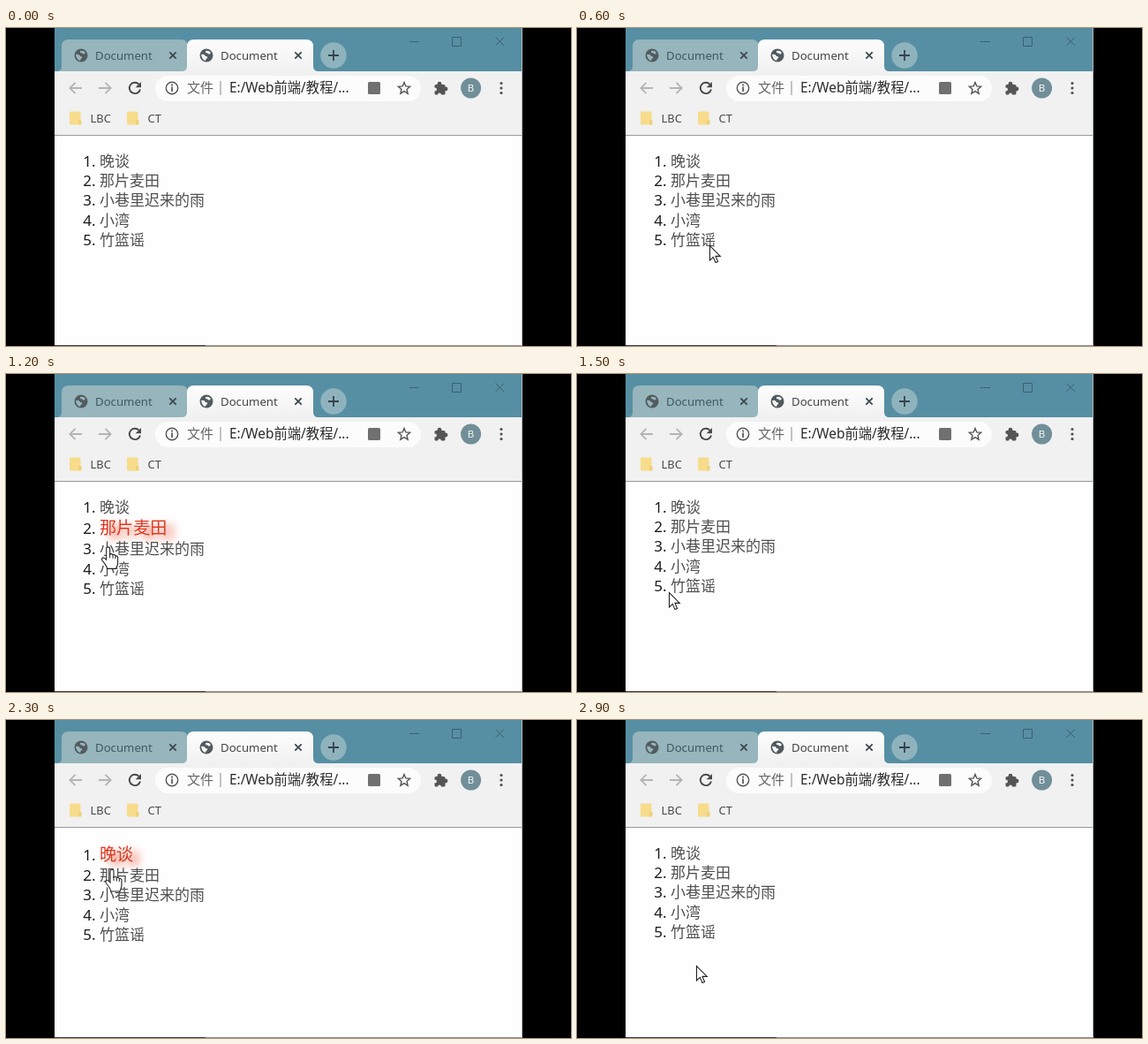
An HTML page with a canvas that plays this animation: 640x360 px, repeating every 3 s.

```html
<!DOCTYPE html>
<html lang="zh-CN">
<head>
<meta charset="utf-8">
<style>
html, body { margin: 0; width: 100%; height: 100%; overflow: hidden; background: #000; }
canvas { display: block; width: 640px; height: 360px; }
</style>
</head>
<body>
<canvas id="stage" width="640" height="360"></canvas>
<script>
const ctx = document.getElementById('stage').getContext('2d');
const FONT = '"Noto Sans", "Noto Sans CJK SC", sans-serif';
const LOOP = 3000, STEP = 100, HOVER_LAG = 100;
const ITEMS = ['晚谈', '那片麦田', '小巷里迟来的雨', '小湾', '竹篮谣'];
const ROW = 22.2, LIST_TOP = 140, LIST_X = 106;

// Pointer path: time, x, y
const PATH = [
  [0, 190, 385], [500, 158, 272], [600, 150, 246], [700, 146, 222],
  [900, 129, 159], [1000, 126, 157], [1100, 123, 168], [1400, 101, 250],
  [1500, 104, 247], [1600, 118, 236], [1800, 134, 219], [1900, 136, 210],
  [2100, 128, 166], [2200, 122, 156], [2300, 120, 169], [2400, 122, 200],
  [2600, 132, 266], [2900, 135, 278]
];
const ARROW = new Path2D('M.5 .5V17L4.3 13.4L7 19.6L9.6 18.5L7 12.4H12.3Z');
const HAND = new Path2D('M-2 2Q-2 .5 0 .5Q2 .5 2 2V9Q4 7.3 5.4 9.5Q7.4 8.4 8.3 10.6Q11 10 11 13V18Q11 21 9 25H-1Q-2 21 -6.5 16Q-8 13.5 -6 12.6Q-4.5 12 -2 15Z');

function pointer(t) {
  const next = PATH.findIndex(p => p[0] >= t);
  if (next < 1) return PATH[next < 0 ? PATH.length - 1 : 0].slice(1);
  const [t0, x0, y0] = PATH[next - 1], [t1, x1, y1] = PATH[next];
  const k = (t - t0) / (t1 - t0);
  return [x0 + (x1 - x0) * k, y0 + (y1 - y0) * k];
}

function hoveredRow([x, y]) {
  const row = Math.floor((y - LIST_TOP) / ROW);
  const item = ITEMS[row];
  return item && x >= LIST_X && x <= LIST_X + item.length * 17 ? row : -1;
}

function rect(x, y, w, h, color, radius = 0) {
  ctx.fillStyle = color;
  ctx.beginPath();
  ctx.roundRect(x, y, w, h, radius);
  ctx.fill();
}

function circle(x, y, r, color) {
  rect(x - r, y - r, 2 * r, 2 * r, color, r);
}

function stroke(d, color, width) {
  ctx.strokeStyle = color;
  ctx.lineWidth = width;
  ctx.stroke(new Path2D(d));
}

function fill(d, color) {
  ctx.fillStyle = color;
  ctx.fill(new Path2D(d));
}

function text(s, x, y, size, color, align = 'left') {
  ctx.font = `${size}px ${FONT}`;
  ctx.textAlign = align;
  ctx.fillStyle = color;
  ctx.fillText(s, x, y);
}

function tab(x, color, ink) {
  fill(`M${x - 6} 49Q${x} 49 ${x} 43V21Q${x} 13 ${x + 8} 13H${x + 135}Q${x + 143} 13 ${x + 143} 21V43Q${x + 143} 49 ${x + 149} 49Z`, color);
  circle(x + 22, 31, 7.5, '#525b5f');
  fill(`M${x + 16} 30q4 -1 5 2q3 0 2 2q-2 1 -2 3q-4 -1 -5 -7zM${x + 21} 26q4 -1 6 2q-2 3 -3 1q-1 -1 -3 -1z`, color);
  text('Document', x + 38, 36, 13.2, ink);
  stroke(`M${x + 122.3} 27.3l7.4 7.4m0 -7.4l-7.4 7.4`, '#39464b', 1.7);
}

function folder(x, label) {
  rect(x, 94.5, 12.5, 15, '#f7dc8c', 1);
  rect(x + 10, 104, 3.5, 5.5, '#f0d078', 1);
  text(label, x + 23.5, 107, 12.9, '#484848');
}

function star(x, y, r) {
  const points = Array.from({ length: 10 }, (_, i) => {
    const a = i * Math.PI / 5, q = i % 2 ? r * 0.45 : r;
    return `${x + q * Math.sin(a)} ${y - q * Math.cos(a)}`;
  });
  stroke(`M${points.join('L')}Z`, '#555', 1.4);
}

function drawBrowser() {
  rect(0, 0, 640, 360, '#000');
  rect(55, 0, 530, 360, '#fefefe');
  rect(55, 0, 530, 49, '#568fa3');
  tab(63, '#96b5bc', '#425860');
  const sheen = ctx.createLinearGradient(0, 13, 0, 49);
  sheen.addColorStop(0, '#fdfdfd');
  sheen.addColorStop(1, '#f1f1f1');
  tab(205, sheen, '#454545');
  circle(371, 31, 14.7, '#8fb3bd');
  stroke('M365 31h12m-6 -6v12', '#35434a', 1.8);
  stroke('M457 15.5h11M505.5 10.5h10v10h-10zM554.5 10.5l9.5 9.5m0 -9.5l-9.5 9.5', '#3a616f', 1);

  rect(55, 49, 530, 72, '#f1f1f1');
  rect(55, 121, 530, 1, '#999');
  stroke('M86 68H72.5m6 -6.2l-6.2 6.2l6.2 6.2M105 68h13.5m-6 -6.2l6.2 6.2l-6.2 6.2', '#b4b4b4', 1.8);
  stroke('M150.5 63.6A6.2 6.2 0 1 0 152 69.5', '#484848', 1.9);
  fill('M153 61v6.3h-6.3z', '#484848');

  rect(169, 54, 301, 29, '#fcfcfc', 14.5);
  stroke('M181.3 68a6.7 6.7 0 1 0 13.4 0a6.7 6.7 0 1 0 -13.4 0', '#555', 1.4);
  rect(187.2, 66.5, 1.7, 5.5, '#555');
  rect(187.2, 63.6, 1.7, 1.8, '#555');
  text('文件', 205, 73, 15.1, '#666');
  rect(242.5, 60, 1, 16, '#888');
  text('E:/Web前端/教程/...', 253, 73, 15.35, '#2b2b2b');
  rect(410, 61, 14, 14, '#707070', 1.5);
  star(451, 68.5, 7);
  rect(485.5, 64, 12, 11.5, '#555', 1.5);
  circle(491, 63.2, 2.4, '#555');
  circle(498, 69, 2.4, '#555');
  circle(486, 69.5, 1.9, '#f1f1f1');
  circle(491, 75.3, 1.9, '#f1f1f1');
  circle(526.6, 68, 11.5, '#718f99');
  text('B', 526.6, 72, 11.5, '#f4f8f8', 'center');
  [62.5, 68, 73.5].forEach(y => circle(561, y, 1.6, '#505050'));
  folder(72, 'LBC');
  folder(137, 'CT');

  rect(55, 359, 171, 1, '#38343b');
  rect(226, 359, 359, 1, '#8a8a8a');
  rect(584, 0, 1, 360, '#b4b9bb');
}

function drawList(active) {
  ITEMS.forEach((item, i) => {
    const hot = i === active;
    const shift = hot ? 2 : active >= 0 && i > active ? 3 : 0;
    const y = 157 + i * ROW + shift;
    text(`${i + 1}.`, 101.5, y, 17, '#1c1c1c', 'right');
    ctx.save();
    if (hot) {
      ctx.shadowColor = 'rgba(235, 65, 30, .75)';
      ctx.shadowBlur = 9;
      ctx.shadowOffsetX = 9;
      ctx.shadowOffsetY = 5;
    }
    text(item, LIST_X, y, hot ? 19.1 : 17, hot ? '#dc3820' : '#505050');
    ctx.restore();
  });
}

function drawPointer([x, y], shape) {
  ctx.save();
  ctx.translate(x, y);
  ctx.fillStyle = '#fff';
  ctx.fill(shape);
  ctx.strokeStyle = '#222';
  ctx.lineWidth = 1.1;
  ctx.stroke(shape);
  if (shape === HAND) stroke('M2 8v5M5.4 9.5v4M8.3 10.6v3.4', '#222', 1);
  ctx.restore();
}

function draw(now) {
  const t = Math.floor(now % LOOP / STEP) * STEP;
  const active = hoveredRow(pointer(t - HOVER_LAG));
  drawBrowser();
  drawList(active);
  drawPointer(pointer(t), active < 0 ? ARROW : HAND);
  requestAnimationFrame(draw);
}
requestAnimationFrame(draw);
</script>
</body>
</html>
```
